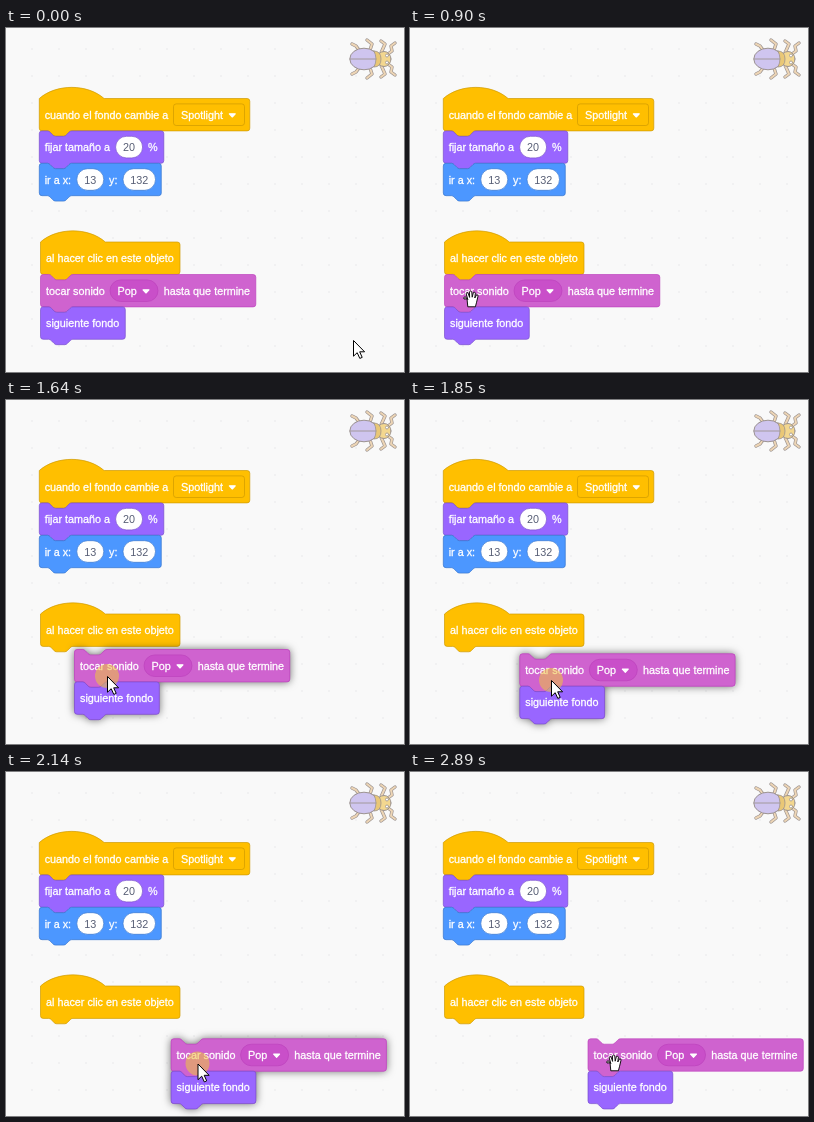
Animation of 398 by 344 pixels, one loop 3.48 s. Source, as an HTML page with a canvas:

```html
<!DOCTYPE html>
<html lang="es">
<head>
<meta charset="utf-8">
<title>Bloques</title>
<style>
html, body { margin: 0; width: 100%; height: 100%; overflow: hidden; background: #f9f9f9; }
canvas { display: block; width: 398px; height: 344px; }
</style>
</head>
<body>
<canvas id="stage"></canvas>
<script>
const W = 398, H = 344, LOOP = 3480, U = 0.675, ROW = 48 * U;
const canvas = document.getElementById('stage');
const ctx = canvas.getContext('2d');
const dpr = window.devicePixelRatio || 1;
canvas.width = W * dpr;
canvas.height = H * dpr;

const EVENTS = { fill: '#ffbf00', line: '#cc9900' };
const LOOKS = { fill: '#9966ff', line: '#774dcb' };
const MOTION = { fill: '#4c97ff', line: '#3373cc' };
const SOUND = { fill: '#cf63cf', line: '#bd42bd', slot: '#c94fc9' };
const FONT = '10.8px "Liberation Sans", Arial, sans-serif';

// Outline in block units: notch on top (or a hat), tab below
function blockPath(x, y, width, hat) {
  const w = width / U, h = 48;
  const notch = 'c2 0 3 1 4 2l4 4c1 1 2 2 4 2h12c2 0 3-1 4-2l4-4c1-1 2-2 4-2';
  const tab = 'c-2 0-3 1-4 2l-4 4c-1 1-2 2-4 2h-12c-2 0-3-1-4-2l-4-4c-1-1-2-2-4-2';
  const top = hat ? 'M0 0c25-22 71-22 96 0' : 'M0 4A4 4 0 0 1 4 0H12' + notch;
  const d = `${top}H${w - 4}a4 4 0 0 1 4 4V${h - 4}a4 4 0 0 1-4 4H48${tab}H4a4 4 0 0 1-4-4Z`;
  const path = new Path2D();
  path.addPath(new Path2D(d), new DOMMatrix([U, 0, 0, U, x, y]));
  return path;
}

function paint(path, fill, line, width = U) {
  ctx.fillStyle = fill;
  ctx.fill(path);
  ctx.strokeStyle = line;
  ctx.lineWidth = width;
  ctx.stroke(path);
}

function block(x, y, w, tone, hat) {
  paint(blockPath(x, y, w, hat), tone.fill, tone.line);
}

function label(text, x, mid) {
  ctx.font = FONT;
  ctx.textAlign = 'left';
  ctx.fillStyle = ctx.strokeStyle = '#fff';
  ctx.lineWidth = 0.3;
  ctx.fillText(text, x, mid + 4);
  ctx.strokeText(text, x, mid + 4);
}

function slot(x, mid, w, r, fill, line) {
  const path = new Path2D();
  path.roundRect(x, mid - 10.8, w, 21.6, r);
  paint(path, fill, line);
}

function number(text, x, mid, w, tone) {
  slot(x, mid, w, 10.8, '#fff', tone.line);
  ctx.font = FONT;
  ctx.textAlign = 'center';
  ctx.fillStyle = '#575e75';
  ctx.fillText(text, x + w / 2, mid + 4);
}

function caret(x, y) {
  ctx.lineJoin = 'round';
  paint(new Path2D(`M${x - 3} ${y - 1.5}h6l-3 3.2z`), '#fff', '#fff', 1.1);
  ctx.lineJoin = 'miter';
}

function background() {
  ctx.fillStyle = '#f9f9f9';
  ctx.fillRect(0, 0, W, H);
  ctx.fillStyle = '#e8e8ea';
  for (let x = 26; x < W; x += 27)
    for (let y = 21; y < H; y += 27) ctx.fillRect(x - 0.7, y - 0.7, 1.4, 1.4);
}

function beetle() {
  const ink = '#9c9390';
  ctx.save();
  ctx.translate(0, 31);
  ctx.lineCap = ctx.lineJoin = 'round';
  const limbs = new Path2D();
  for (const s of [-1, 1]) {
    limbs.addPath(new Path2D('M353-9L350-13L346-15M364-9L366-15L361-19M375-6L379-15L375-18M382-5L386-8L385-13L389-16'),
      new DOMMatrix([1, 0, 0, s, 0, 0]));
  }
  ctx.strokeStyle = ink;
  ctx.lineWidth = 3.4;
  ctx.stroke(limbs);
  ctx.strokeStyle = '#edd5b5';
  ctx.lineWidth = 2;
  ctx.stroke(limbs);
  const head = new Path2D();
  head.ellipse(378, 0, 7, 7.5, 0, 0, 7);
  paint(head, '#f3d78f', ink, 1);
  const body = new Path2D();
  body.ellipse(358, 0, 14.2, 10.8, 0, 0, 7);
  paint(body, '#cfc5ef', ink, 1);
  paint(new Path2D('M368-8Q375-8 375 0Q375 8 368 8Q372 0 368-8Z'), '#e9c776', ink, 0.8);
  ctx.lineWidth = 0.9;
  ctx.stroke(new Path2D('M344 0H370'));
  for (const y of [-3.5, 3.5]) {
    const eye = new Path2D();
    eye.arc(381, y, 1.5, 0, 7);
    paint(eye, '#fff', ink, 0.8);
  }
  ctx.restore();
}

function fixedScripts() {
  const y = 70.5, m = y + ROW / 2;
  block(33.3, y, 210.5, EVENTS, true);
  label('cuando el fondo cambie a', 38.7, m);
  slot(167.5, m, 71, 2.7, EVENTS.fill, EVENTS.line);
  label('Spotlight', 175, m);
  caret(226.3, m + 0.6);

  block(33.3, y + ROW, 124.5, LOOKS);
  label('fijar tamaño a', 38.7, m + ROW);
  number('20', 109.6, m + ROW, 27, LOOKS);
  label('%', 142, m + ROW);

  block(33.3, y + 2 * ROW, 122, MOTION);
  label('ir a x:', 38.7, m + 2 * ROW);
  number('13', 70.8, m + 2 * ROW, 27, MOTION);
  label('y:', 103, m + 2 * ROW);
  number('132', 117, m + 2 * ROW, 32.5, MOTION);

  block(34.5, 214, 139.5, EVENTS, true);
  label('al hacer clic en este objeto', 40, 230.3);
}

function movingScript(dx, dy, lifted) {
  const x = 34.5, y = 246.5, m = y + ROW / 2;
  ctx.save();
  ctx.translate(dx, dy);
  if (lifted) {
    const all = blockPath(x, y, 215.3);
    all.addPath(blockPath(x, y + ROW, 84.8));
    ctx.save();
    ctx.shadowColor = 'rgba(0,0,0,.6)';
    ctx.shadowBlur = 8 * dpr;
    ctx.fillStyle = SOUND.fill;
    ctx.fill(all);
    ctx.restore();
  }
  block(x, y, 215.3, SOUND);
  label('tocar sonido', 40, m);
  slot(104, m, 48, 10.8, SOUND.slot, SOUND.line);
  label('Pop', 111.5, m);
  caret(140, m + 0.6);
  label('hasta que termine', 157.7, m);
  block(x, y + ROW, 84.8, LOOKS);
  label('siguiente fondo', 40, m + ROW);
  ctx.restore();
}

const ARROW = new Path2D('M.5.5V16.2L4.2 12.7L6.8 18.4L9.2 17.4L6.7 11.8H11.6Z');
const OPEN = new Path2D('M-3.2 7.8L-4-.2L-7 0Q-8-1.8-6-2.2Q-4.6-2-3.2.6L-4.8-5.2Q-4.6-7-3-6.2L-1.4-1.6L-1.6-7.2Q-.4-8.6.8-7.2L1.2-1.8L2.4-6.6Q4-7.4 4.4-5.8L3.8-1L5.6-4.2Q7.2-4.4 7-2.8L5.6 3.2L4.4 7.8Z');
const CLOSED = new Path2D('M-3 7.3V5.2L-6.4 1.5Q-7-.7-4.6-.5V-3.6Q-3.6-5.4-2-4.2Q-.9-6.2.9-4.6Q2.6-5.8 3.6-3.8Q5.8-4.4 6.2-2.2V2.8L4.4 7.3Z');
const KNUCKLES = new Path2D('M-1.8-4V-1M1-4.4V-1M3.7-3.6V-1M-4.4 0V2');

function cursor(kind, x, y, pressed) {
  ctx.save();
  ctx.translate(x, y);
  if (pressed) {
    ctx.fillStyle = 'rgba(238,198,60,.55)';
    ctx.beginPath();
    ctx.arc(0, 0, 12, 0, 7);
    ctx.fill();
  }
  ctx.lineJoin = 'round';
  if (kind === 'arrow') paint(ARROW, '#fff', '#000', 1);
  else {
    paint(kind === 'open' ? OPEN : CLOSED, pressed ? '#fbe98a' : '#fff', '#111', 1);
    if (kind === 'closed') ctx.stroke(KNUCKLES);
  }
  ctx.restore();
}

// time, pointer x, y, script dx, dy
const DRAG = [
  [1430, 66, 272, 0, 0],
  [1500, 76, 273, 0, 0],
  [1570, 88, 274, 20, 2],
  [1640, 101, 276, 34, 3],
  [1710, 115, 277, 48, 4],
  [1780, 129, 279, 63, 6],
  [1850, 141, 280, 75.3, 7.3],
  [1920, 148, 283, 87, 12],
  [1990, 160, 286, 99, 15],
  [2070, 177, 289, 116, 18],
  [2140, 191.5, 291.5, 130.6, 20.3],
  [2210, 196, 291.5, 135, 20.3],
  [2280, 199, 291.5, 138, 20.3],
  [2350, 202, 291.5, 141, 20.3],
  [2480, 204, 291, 143.5, 20.3]
];

const mix = (a, b, p) => a + (b - a) * p;
const steps = (t, start, count) => Math.max(0, Math.min(count, Math.floor((t - start) / 70) + 1)) / count;

function pose(t) {
  if (t < 690) {
    const k = steps(t, 130, 8), p = k * k * (3 - 2 * k);
    return { kind: 'arrow', x: mix(347, 138, p), y: mix(312, 301, p), dx: 0, dy: 0 };
  }
  if (t < 1430) {
    const k = steps(t, 690, 4), p = 1 - (1 - k) ** 1.7;
    const x = mix(138, 61, p), y = mix(301, 271, p);
    return { kind: x < 119 ? 'open' : 'arrow', x, y, dx: 0, dy: 0, pressed: t >= 1230 };
  }
  const [, x, y, dx, dy] = DRAG.filter(row => row[0] <= t).pop();
  const kind = t < 1570 ? 'closed' : t < 2890 ? 'arrow' : 'open';
  return { kind, x, y, dx, dy, pressed: t < 2810, lifted: t >= 1570 && t < 2890 };
}

function draw(t) {
  const p = pose(t);
  ctx.setTransform(dpr, 0, 0, dpr, 0, 0);
  background();
  beetle();
  fixedScripts();
  movingScript(p.dx, p.dy, p.lifted);
  cursor(p.kind, p.x, p.y, p.pressed);
}

const began = performance.now();
function tick() {
  draw((performance.now() - began) % LOOP);
  requestAnimationFrame(tick);
}
tick();
</script>
</body>
</html>
```
